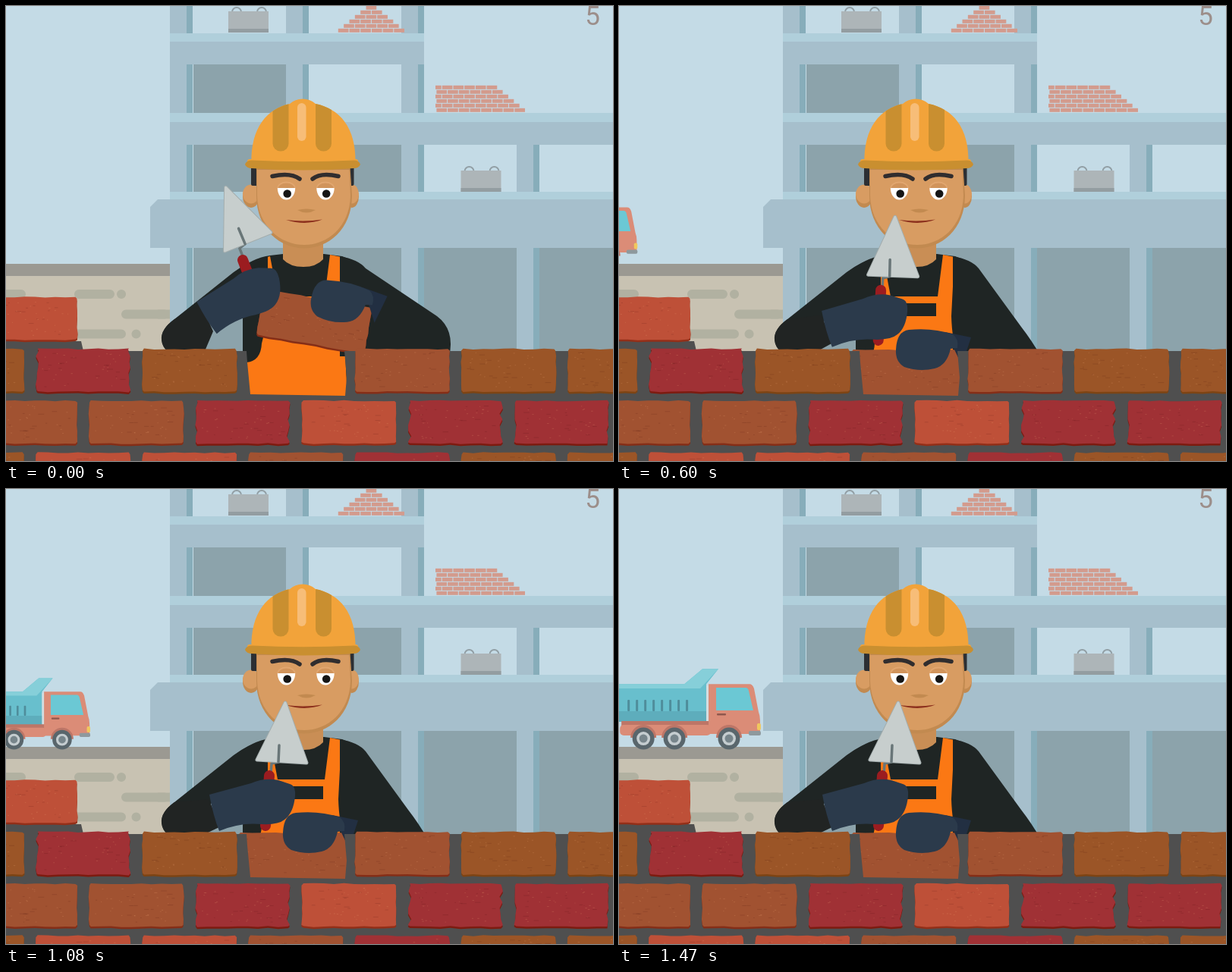
An HTML page with a canvas that plays this animation: 800x600 px, repeating every 1.5 s.

```html
<!DOCTYPE html>
<html lang="en">
<head>
<meta charset="utf-8">
<title>Bricklayer</title>
<style>
  html, body { margin: 0; width: 100%; height: 100%; overflow: hidden; background: #c4dbe6; }
  canvas { display: block; width: 800px; height: 600px; }
</style>
</head>
<body>
<canvas id="stage" width="800" height="600"></canvas>
<script>
const stage = document.getElementById('stage').getContext('2d');
const LOOP = 1500, STEP = 30;
let c = stage;

const SHIRT = '#1f2524', GLOVE = '#2b3a4b', CUFF = '#222f42', ORANGE = '#fb7814';
const SKIN = '#d89c62', SKIN_DARK = '#c28a50', HELMET = '#f2a33a', HELMET_DARK = '#c98f30';
const BRICKS = {
  r: { face: '#a03135', edge: '#7d1b10', jag: 5 },
  b: { face: '#9b5527', edge: '#7d4414', jag: 1.5 },
  u: { face: '#a15231', edge: '#852e17', jag: 1.5 },
  c: { face: '#be5038', edge: '#932f18', jag: 1.5 }
};

// ---------- helpers ----------
const mix = (a, b, k) => a + (b - a) * k;
const clamp = v => Math.max(0, Math.min(1, v));
const ramp = (t, from, to) => {
  const u = clamp((t - from) / (to - from));
  return u * u * (3 - 2 * u);
};
const easeOut = (t, length, power) => 1 - Math.pow(1 - clamp(t / length), power);

function random(seed) {
  return () => {
    seed = (seed * 16807) % 2147483647;
    return seed / 2147483647;
  };
}

function rect(color, x, y, w, h, r = 0) {
  c.fillStyle = color;
  c.beginPath();
  c.roundRect(x, y, w, h, r);
  c.fill();
}

function ellipse(color, x, y, rx, ry = rx, from = 0, to = Math.PI * 2) {
  c.fillStyle = color;
  c.beginPath();
  c.ellipse(x, y, rx, ry, 0, from, to);
  c.fill();
}

function shape(color, path) {
  c.fillStyle = color;
  c.fill(new Path2D(path), 'evenodd');
}

function line(color, width, path) {
  c.strokeStyle = color;
  c.lineWidth = width;
  c.lineCap = c.lineJoin = 'round';
  c.stroke(new Path2D(path));
}

function placed(x, y, degrees, paint) {
  c.save();
  c.translate(x, y);
  c.rotate(degrees * Math.PI / 180);
  paint();
  c.restore();
}

function layer(paint) {
  const canvas = document.createElement('canvas');
  canvas.width = 800;
  canvas.height = 600;
  c = canvas.getContext('2d');
  paint();
  c = stage;
  return canvas;
}

// ---------- bricks ----------
// Four rough sides walked clockwise, each in a few seeded steps.
function brick(kind, x, y, w, h) {
  const { face, edge, jag } = BRICKS[kind];
  const rnd = random(Math.round(Math.abs(x) * 31 + Math.abs(y) * 17 + 99));
  const outline = new Path2D();
  const side = (steps, point) => {
    for (let i = 0; i <= steps; i++) outline.lineTo(...point(i / steps));
  };
  side(9, u => [x + mix(3, w - 3, u), y + rnd() * 1.6]);
  side(7, u => [x + w - rnd() * jag, y + mix(3, h - 5, u)]);
  side(9, u => [x + mix(w - 3, 3, u), y + h - 2 - rnd() * 1.5]);
  side(7, u => [x + rnd() * jag, y + mix(h - 5, 3, u)]);
  outline.closePath();

  c.save();
  c.translate(0, 2.5);
  c.fillStyle = edge;
  c.fill(outline);
  c.restore();
  c.fillStyle = face;
  c.fill(outline);
  for (let i = 0; i < 46; i++) {
    const dark = i % 3 === 0;
    c.fillStyle = dark ? 'rgba(60,10,10,.14)' : 'rgba(240,170,120,.2)';
    c.fillRect(x + 8 + rnd() * (w - 20), y + 5 + rnd() * (h - 14), 1 + rnd() * (dark ? 7 : 1.6), 1);
  }
}

function paintWall() {
  shape('#4f4f4f', 'M0 442H99L102 455H800V600H0z M317 455L318 470L322 512L447 514L449 490L446 455z');
  ['c', 'brb ubb', 'uurcrr', 'bccurbb'].forEach((row, r) => {
    [...row].forEach((kind, i) => {
      const x = -101.5 + 140.2 * i + (r % 2 ? 0 : 70);
      if (kind !== ' ') brick(kind, x, 383 + 68.4 * r, 126, 60);
    });
  });
}

// ---------- background ----------
function weight(x, y) {
  line('#929fa5', 2, `M${x + 5} ${y + 1}a6 6 0 1 1 12 0M${x + 38} ${y + 1}a6 6 0 1 1 12 0`);
  rect('#adb5b8', x, y, 53, 28);
  rect('#939da1', x, y + 23, 53, 5);
}

// Rows shrink by half a brick on the right, and on the left too for a pyramid.
function pile(left, right, bottom, isPyramid) {
  const pitch = 14.7;
  for (let row = 0; row < 6; row++) {
    const inset = row * pitch / 2;
    const start = isPyramid ? left + inset : left;
    for (let end = right - inset; end > start + 4; end -= pitch) {
      const x = Math.max(start, end - pitch + 1);
      rect('#d39b8d', x, bottom - 5.2 - row * 6, end - x, 5);
    }
  }
}

function paintSite() {
  const beam = '#a6bfcc', light = '#b0cfdb', inside = '#8ca3ab', shade = '#87adba';
  const pillar = (x, y, h) => {
    rect(beam, x, y, 22, h);
    rect(shade, x + 22, y, 8, h);
  };
  const floor = (y, width, thickness, trim) => {
    rect(beam, 216, y, width, thickness);
    rect(light, 216, y, width, trim);
  };
  rect('#c4dbe6', 0, 0, 800, 600);
  rect(inside, 247, 77, 122, 64);
  rect(inside, 247, 183, 275, 62);
  rect(inside, 247, 319, 553, 139);
  for (const x of [216, 369, 521]) pillar(x, 0, 141);
  for (const x of [216, 521, 673]) pillar(x, 183, 275);
  floor(36, 335, 41, 11);
  floor(141, 584, 42, 12);
  floor(245, 584, 74, 10);
  shape(beam, 'M200 255H216V319H190V265z');

  weight(293, 7);
  weight(599.5, 217);
  pile(437, 525, 35, true);
  pile(566, 684, 140, false);

  rect('#c8c2b2', 0, 340, 216, 118);
  rect('#9b9992', 0, 340, 216, 16);
  line('#b1b1a1', 12, 'M0 380H20M96 380H137M152 380h.1M158 406.5H209M80 432.500H152M171.500 432.500h.1');
  rect('#b1b1a1', 200, 400.5, 16, 12);

  c.fillStyle = '#9c8e8a';
  c.font = '400 35px Roboto, sans-serif';
  c.textAlign = 'center';
  c.fillText('5', 773, 24.5);
}

// ---------- truck, drawn around the ground under its front wheel ----------
function truck(t) {
  const growth = .1 * ramp(t, 1080, 1500) + .9 - .018 * Math.sin(Math.PI * ramp(t, 840, 1320));
  c.save();
  c.translate(145 - .1822 * (1470 - t), 343);
  c.scale(growth, growth);
  shape('#68bfcd', 'M-185 -86H-59L-35 -106H-14L-30 -86V-36H-175z');
  shape('#86cfd9', 'M-185 -86H-59L-35 -106H-14L-38 -80H-180z');
  rect('#5eadbc', -172, -50, 142, 14);
  for (let x = -134; x < -52; x += 11) rect('#4f8d9b', x, -65, 3, 15, 1);
  rect('#d4dde0', -30, -84, 3, 50);
  rect('#bd7667', -142, -37, 150, 17);
  rect('#db8c77', -144, -32, 120, 14, 5);
  shape('#db8c77', 'M-27 -86H27Q31 -86 33 -80L39 -49Q41 -44 41 -38V-20H-27z');
  shape('#6bc8d4', 'M-17 -81H22Q25 -81 26 -77L32 -51H-17z');
  rect('#8f574d', -16, -47, 12, 2.5, 1);
  rect('#f0c75e', 37, -34, 5, 9, 2);
  rect('#8e999d', 26, -24, 16, 6, 2);
  for (const x of [-113, -72, 0]) {
    ellipse('#bd7667', x, -15, 17, 17, Math.PI, 0);
    ellipse('#59666c', x, -14, 14.5);
    ellipse('#c5cdd0', x, -14, 9);
    ellipse('#77858b', x, -14, 5.5);
  }
  c.restore();
}

// ---------- worker ----------
function torso() {
  shape(SHIRT, 'M348 329L365 327H419L443 330Q462 336 462 350L452 516H314L312 455V400L300 352Q325 332 348 329z');
  shape('#c98e55', 'M365 300H418V334Q409 344 392 344Q374 344 365 334z');
  shape(ORANGE, 'M334 334L348 330L358 383H420L427 328L442 331L438 409Q439 444 447 458L450 516H314L317 470Q336 468 337 445L342 425V412z M358 392V409H418V392z');
}

function head(drop) {
  c.save();
  c.translate(0, drop);
  for (const [x, rx] of [[323, 11], [456, 9]]) {
    ellipse(SKIN_DARK, x, 251, rx, 15);
    ellipse(SKIN, x, 248, rx, 12.5);
  }
  rect('#2c2f33', 323, 205, 135.5, 32, 2);
  shape(SKIN_DARK, 'M330 205V250C330 295 362 319.500 393 319.500S456 295 456 250L453 205z');
  shape(SKIN, 'M331 205V250C332 291 362 315 393 315S453 291 454 250L452 205z');
  rect(SKIN_DARK, 331, 205, 122, 11);

  for (const x of [369.5, 421]) {
    ellipse('#e1a66f', x, 240, 12, 8.5, Math.PI, 0);
    ellipse('#d1945b', x, 241, 11, 7.5, Math.PI, 0);
    ellipse('#fff', x, 240, 11.7, 15.5, 0, Math.PI);
    ellipse('#151515', x + 1.2, 247.5, 5.3);
  }
  line('#302d2e', 5.5, 'M351 224.500Q375 219 387 228M438 224.500Q415 219 404 228');
  shape(SKIN_DARK, 'M384 269Q396 266 408 269Q396 276 384 269z');
  shape('#8c301d', 'M369 282Q393 285 417 281.500Q395 290 369 282z');

  const dome = new Path2D('M323.500 208C322 160 345 135 374 129Q381 122.500 391 122.500T408 129C439 135 462 160 460.500 208z');
  c.save();
  c.clip(dome);
  rect(HELMET, 315, 120, 152, 90);
  for (const x of [351.5, 408]) rect(HELMET_DARK, x, 120, 21, 71.5, 10);
  c.restore();
  rect('#f7bd78', 384, 128, 11.5, 50, 6);
  line(HELMET, 6, 'M321 205Q392 210 461 205');
  shape(HELMET_DARK, 'M315 209Q317 203 325 203.500Q392 207 458 203.500Q465 203 467 209Q465 214 458 214Q392 219 324 214Q317 214 315 209z');
  c.restore();
}

function rightArm(k) {
  const x = mix(568, 530, k), y = mix(409, 423, k);
  const bulge = mix(24, 14, k), wrist = mix(584, 556, k);
  shape(SHIRT, `M440 330Q464 334 474 346L${x} ${y}Q${x + bulge} ${y + 18} ${wrist} 462H440z`);

  placed(mix(407, 380, k), mix(417, 485, k), mix(10, 0, k), () => brick('u', -74, -32, 146, 64));

  // Palm and cuff around the middle of the hand.
  placed(mix(439, 402, k), mix(390, 453, k), mix(8, 0, k), () => {
    shape(CUFF, 'M28 -23L62 -16L50 21L40 0z');
    shape(GLOVE, 'M-37 0Q-36 -24 -20 -26Q12 -29 38 -20Q46 -14 44 -2L35 -1Q30 21 14 25Q-6 30 -26 23Q-38 16 -37 0z');
  });
}

function trowel(kx, ky) {
  placed(mix(312, 347, kx), mix(335, 378, ky), mix(-25.5, 0, kx), () => {
    const blade = 'M21 -96L-16 -21L49 -17z';
    line('#697678', 3.5, 'M2 -2L3 -16L12 -18');
    line('#a3adad', 5, blade);
    shape('#c7cecd', blade);
    line('#c7cecd', 3, blade);
    line('#697678', 3.5, 'M12 -18L13 -40');
    line('#9b1c20', 14, 'M0 0L-5 66');
  });
}

function leftArm(kx, ky) {
  const x = mix(265, 275, kx), y = mix(411, 427, ky), turn = mix(-17, 0, kx);
  shape(SHIRT, 'M345 330Q318 337 300 351L222 413Q204 426 205 440Q206 450 213 455L270 415L312 396H345z');
  shape('#212423', `M222 413Q204 426 205 440Q206 450 213 455H262L${x + 8} ${y + 18}L${x - 8} ${y - 18}z`);
  trowel(kx, ky);
  placed(x, y, turn, () => {
    shape(GLOVE, 'M-7 -24L48 -39Q66 -47 84 -43L99 -38Q107 -36 106 -22Q104 0 92 9Q84 16 62 15Q34 12 6 24Q-2 4 -7 -24z');
  });
}

// ---------- playback ----------
const site = layer(paintSite);
const wall = layer(paintWall);

function draw(t) {
  const lay = easeOut(t, 540, 2);
  const lift = .32 * (ramp(t, 1110, 1275) - ramp(t, 1275, 1440));
  const tap = easeOut(t, 660, 1.22) - lift;
  const nod = 3 * ramp(t, 600, 1080) - 3.5 * lift;
  c.drawImage(site, 0, 0);
  truck(t);
  torso();
  head(nod);
  rightArm(lay);
  leftArm(tap, Math.pow(tap, 1.4));
  c.drawImage(wall, 0, 0);
}

let start = null;
function tick(now) {
  if (start === null) start = now;
  draw(Math.floor(((now - start) % LOOP) / STEP) * STEP);
  requestAnimationFrame(tick);
}
draw(0);
requestAnimationFrame(tick);
</script>
</body>
</html>
```
